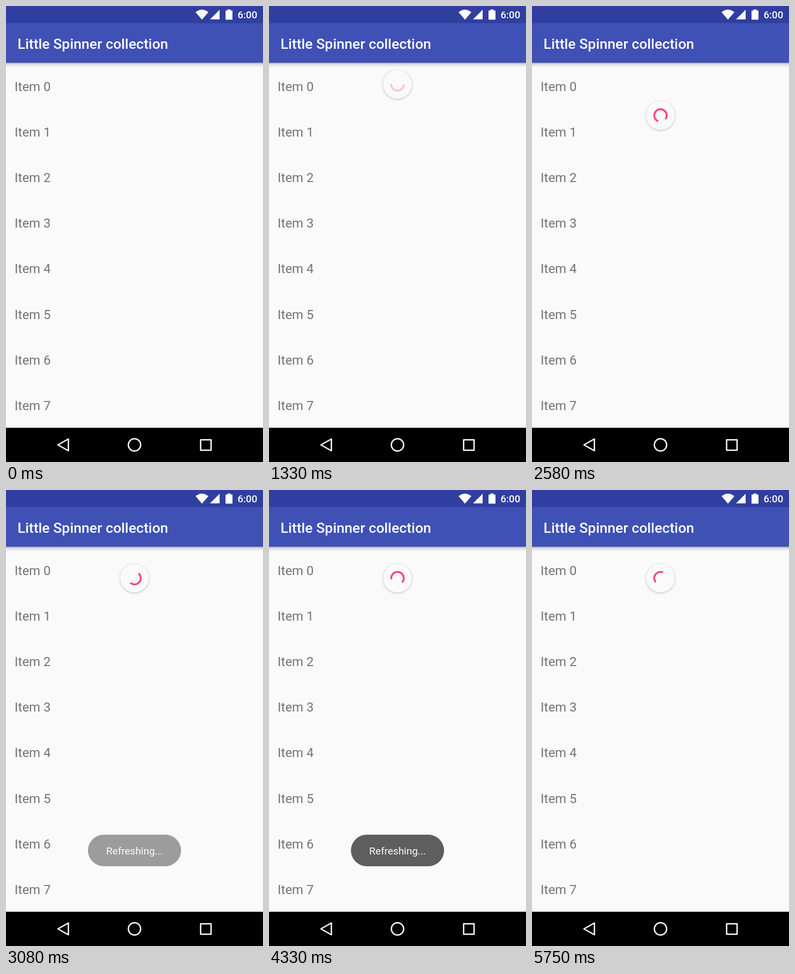
Write an HTML page that moves like this. It is 480 px wide and 852 px high and loops after 5.83 s.

```html
<!DOCTYPE html>
<html lang="en">
<head>
<meta charset="utf-8">
<title>Pull to refresh</title>
<style>
  html, body { margin: 0; width: 100%; height: 100%; overflow: hidden; background: #fafafa; }
  svg { display: block; width: 480px; height: 852px; font-family: Roboto, sans-serif; }
  #disc { filter: drop-shadow(0 1.5px 2px rgba(0, 0, 0, .25)); }
</style>
</head>
<body>
<svg viewBox="0 0 480 852">
  <defs>
    <linearGradient id="shade" x2="0" y2="1">
      <stop stop-opacity=".3"/>
      <stop offset=".4" stop-opacity=".1"/>
      <stop offset="1" stop-opacity="0"/>
    </linearGradient>
  </defs>
  <rect width="480" height="852" fill="#fafafa"/>
  <g id="list" font-size="24" fill="#747474"></g>
  <rect y="106" width="480" height="9" fill="url(#shade)"/>

  <g id="spinner">
    <circle id="disc" r="26.7" fill="#fafafa"/>
    <circle id="arc" r="11.67" fill="none" stroke="#ff4081" stroke-width="3.33" pathLength="1"/>
  </g>

  <rect y="32" width="480" height="74" fill="#3f51b5"/>
  <rect width="480" height="32" fill="#303f9f"/>
  <text x="21.5" y="79.5" font-size="26.67" font-weight="500" fill="#fff">Little Spinner collection</text>
  <g fill="#fff">
    <path d="M354 11.5Q366 2 378 11.5L366 25.5ZM399 7V25H381ZM410 8.5H413.5V6.5H419.5V8.5H423V25.5H410Z"/>
    <text x="432.5" y="22.7" font-size="18.67" font-weight="500">6:00</text>
  </g>

  <g id="toast">
    <rect x="153" y="644" width="174" height="59" rx="29.5" fill="#5e5e5e"/>
    <text x="240" y="681" font-size="19" text-anchor="middle" fill="#fafafa">Refreshing...</text>
  </g>

  <rect y="788" width="480" height="64" fill="#000"/>
  <g fill="none" stroke="#fff" stroke-width="2.5" stroke-linejoin="round">
    <path d="M97 820L116.5 809V831ZM363.5 810.5H383V830H363.5Z"/>
    <circle cx="240" cy="820" r="11.5"/>
  </g>
</svg>
<script>
const $ = id => document.getElementById(id);
const LOOP = 5830, STEP = 250 / 3;
const HIDDEN_Y = 79.3, REST_Y = 164.7, PULL_Y = 204.5;
const PULL = 950, RELEASE = 2635, REFRESH = 2835, FINISH = 667, SPIN = 3507, CYCLE = 1345;
const MAX_ARC = 0.8;

const progress = (t, start, length) => Math.min(1, Math.max(0, (t - start) / length));
const easeOut = (p, power = 2) => 1 - (1 - p) ** power;

// cubic-bezier(.4, 0, .2, 1)
function fastOutSlowIn(x) {
  let low = 0, high = 1;
  for (let i = 0; i < 20; i++) {
    const s = (low + high) / 2, r = 1 - s;
    if (1.2 * r * r * s + 0.6 * r * s * s + s ** 3 < x) low = s; else high = s;
  }
  return 3 * (1 - low) * low * low + low ** 3;
}

function spinnerY(t) {
  const pulled = HIDDEN_Y + (PULL_Y - HIDDEN_Y) * easeOut(progress(t, PULL, 1250), 2.1);
  return pulled + (REST_Y - pulled) * easeOut(progress(t, RELEASE, REFRESH - RELEASE));
}

// Arc while the finger pulls: [tail, head, rotation] in turns.
function pullArc(y) {
  const drag = (y - HIDDEN_Y) / (REST_Y - HIDDEN_Y);
  const shown = Math.max(Math.min(1, drag) - 0.4, 0) * 5 / 3;
  return [0, MAX_ARC * shown, (-0.25 + 0.4 * shown + Math.max(0, drag - 1)) / 2];
}

function arcAt(t) {
  if (t < REFRESH) return pullArc(spinnerY(Math.min(t, RELEASE)));
  if (t < SPIN) {
    const p = progress(t, REFRESH, FINISH), turn = pullArc(PULL_Y)[2];
    return [MAX_ARC * p, MAX_ARC, turn + (1 - turn) * p];
  }
  const cycles = (t - SPIN) / CYCLE, n = Math.floor(cycles), u = cycles - n;
  const base = MAX_ARC * (n + 1);
  const grow = from => base + MAX_ARC * fastOutSlowIn(progress(u, from, 0.5));
  return [grow(0.5), grow(0), 0.85 * cycles];
}

function draw(now) {
  const t = Math.floor((now % LOOP + 4) / STEP) * STEP;
  const [tail, head, rotation] = arcAt(t);
  $("spinner").setAttribute("transform", `translate(240 ${spinnerY(t)})`);
  $("spinner").setAttribute("visibility", t < PULL ? "hidden" : "visible");
  $("arc").setAttribute("transform", `rotate(${360 * (tail + rotation)})`);
  $("arc").setAttribute("stroke-dasharray", `${Math.max(0.001, head - tail)} 2`);
  $("arc").setAttribute("opacity", 0.3 + 0.7 * progress(t, 1500, 300));
  $("toast").setAttribute("opacity", easeOut(progress(t, 2900, 500)) - progress(t, 4870, 500) ** 2);
}

for (let i = 0; i < 8; i++) {
  $("list").innerHTML += `<text x="16" y="${158.6 + i * 85.2}">Item ${i}</text>`;
}

(function tick() {
  draw(performance.now());
  requestAnimationFrame(tick);
})();
</script>
</body>
</html>
```
